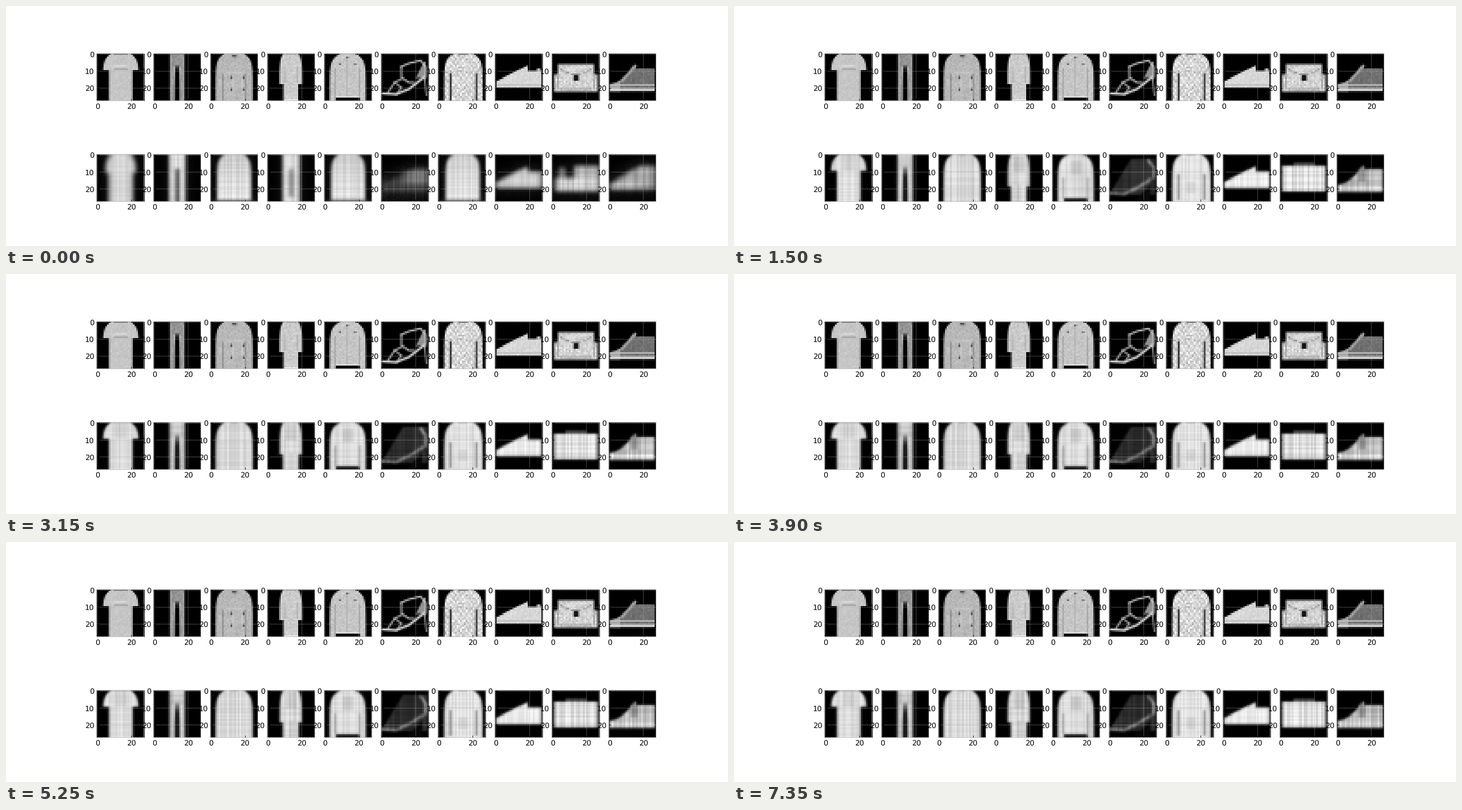
A matplotlib script that plays this animation: 1280x427 px, repeating every 7.5 s.

```python
import matplotlib.pyplot as plt
import numpy as np
from matplotlib.animation import FuncAnimation

N, FRAMES, STEP = 28, 50, 150
W, H, DPI = 1280, 427, 80
SCALE = 16 / 15  # keeps the point sizes of a 15 inch wide figure
rng = np.random.default_rng(7)
X, Y = np.meshgrid(np.arange(N) + 0.5, np.arange(N) + 0.5)

plt.rcParams.update({
    "font.family": "DejaVu Sans", "font.size": 11 * SCALE,
    "text.hinting": "none",
    "axes.edgecolor": "#bcbcbc", "axes.linewidth": 0.8 * SCALE,
    "axes.grid": True, "axes.axisbelow": True,
    "grid.color": "#b2b2b2", "grid.linestyle": "--",
    "grid.linewidth": 0.5 * SCALE,
})
for axis in ("xtick", "ytick"):
    plt.rcParams.update({
        axis + ".direction": "in", axis + ".major.size": 3.5 * SCALE,
        axis + ".major.pad": 3.5 * SCALE, axis + ".major.width": 0.8 * SCALE})


# Masks: pixel coverage between 0 and 1.
def cover(depth):
    return np.clip(depth + 0.5, 0, 1)


def overlap(pos, lo, hi):
    return np.clip(np.minimum(hi, pos + 0.5) - np.maximum(lo, pos - 0.5), 0, 1)


def box(x0, x1, y0, y1):
    return overlap(X, x0, x1) * overlap(Y, y0, y1)


def pair(near, far, y0, y1, c=14):
    """Two boxes, mirrored around the column c."""
    return overlap(np.abs(X - c), near, far) * overlap(Y, y0, y1)


def line(*pts, w=1.0):
    dist = np.full((N, N), 99.0)
    for (x0, y0), (x1, y1) in zip(pts, pts[1:]):
        dx, dy = x1 - x0, y1 - y0
        t = np.clip(((X - x0) * dx + (Y - y0) * dy) / (dx * dx + dy * dy), 0, 1)
        dist = np.minimum(dist, np.hypot(X - x0 - t * dx, Y - y0 - t * dy))
    return cover(w / 2 - dist)


def top(neck, wide, c=14, end=N, body=0, fall=3):
    """Garment with round shoulders; below `end` only the body is left."""
    half = neck + (wide - neck) * (1 - np.exp(-Y / fall))
    return cover(np.where(Y < end, half, body) - np.abs(X - c))


def legs(half, crotch, gap, c=14):
    split = gap * (1 - np.exp(-np.maximum(Y - crotch, 0) / 5))
    r = np.abs(X - c)
    return cover(half - r) * np.where(Y > crotch, cover(r - split), 1)


def shoe(toe, peak_x, peak, collar, base, power=1.0):
    """Side view: the instep climbs to a peak, then a level collar."""
    instep = toe + (peak - toe) * np.clip(X / peak_x, 0, 1) ** power
    edge = np.where(X < peak_x + 1, instep, collar)
    return cover(np.minimum(Y - edge, base - Y)) * box(0.8, 27, 0, N)


# Tones
def grain(tone, spread):
    return tone + spread * rng.standard_normal((N, N))


def compose(*layers):
    img = np.zeros((N, N))
    for mask, tone in layers:
        img = img * (1 - mask) + tone * mask
    return img


def blur(img, sigma):
    i = np.arange(N)
    k = np.exp(-((i[:, None] - i) / sigma) ** 2 / 2)
    k /= k.sum(1, keepdims=True)
    return k @ img @ k.T


def dome(c=14):
    """Round-topped block every long-sleeved top starts from."""
    return compose((top(5, 10, c, fall=2.6), 203 + 1.1 * Y),
                   (box(0, N, 27, N), 50))


# Each item: input, first guess, learned picture, aura, softness, stripes.
tee = top(5, 10.5, end=9.7, body=6.8)
shirt = (
    compose((tee, grain(198, 4)), (box(10, 18, 0, 1), 120),
            (cover(0.1 - np.abs(Y - 7.3 - ((X - 14) / 5) ** 2))
             * box(9, 19, 0, N), 240),
            (box(10, 18, 9, 9.6), 150)),
    compose((top(5, 9, end=11, body=7), 212)),
    compose((tee, 222), (box(10, 18, 0, 1), 185), (box(11, 17, 1, 10), 207)),
    26, 1.5, 0.04)

trousers = (
    compose((legs(4.2, 6.5, 1.7), grain(145, 8)), (box(10, 18, 0, 1), 115),
            (pair(3.2, 3.7, 2, N), 175), (pair(1.5, 2.2, 8, N), 205)),
    compose((legs(4.8, N, 0), 218), (box(13.4, 15, 9, N), 30)),
    compose((legs(4.4, 7, 1.3), 195), (box(10, 18, 0.5, 1.3), 240),
            (pair(1.9, 2.7, 9, N), 225)),
    24, 0.9, 0.05)

pullover = (
    compose((top(5, 10.8), grain(184, 6)), (box(12.8, 15.4, 1, 2.3), 80),
            (pair(6.6, 7, 12, N), 100), (box(9, 19, 11.5, 12), 205),
            *[(pair(2.8, 3.6, y, y + 1.5, 16), 20) for y in (13.5, 20.5)],
            (pair(2.2, 2.7, 13, 22, 16), 215)),
    dome(),
    compose((top(5, 10.8), 218), (box(12, 16, 0, 1), 170),
            (pair(6.6, 7.1, 12, N), 195)),
    24, 0.9, 0.05)

gown = top(4, 6.5, 13.8, end=17.6, body=4.2)
dress = (
    compose((gown, grain(204, 6)), (box(11, 17, 0, 1), 165),
            (pair(3.6, 3.9, 8, 17, 13.8), 130), (box(10, 18, 27, N), 235)),
    compose((legs(5, N, 0), 215), (box(13.2, 14.8, 9, 25), 85)),
    compose((top(4, 6.3, 13.8, end=19, body=4.5), 215),
            (box(11, 17, 1, 11), 195), (box(13.6, 14.4, 18, N), 165)),
    26, 1.1, 0.05)

coat = top(3.5, 10.5, 13.8)
jacket = (
    compose((coat, grain(198, 6)), (pair(6.8, 7.2, 9, 26, 13.8), 130),
            (box(13.6, 14, 3, 26), 160), (box(7, 20.6, 25, 25.7), 228),
            (box(6.8, 20.8, 26, N), 0), (pair(0, 0.6, 2, 3, 13.6), 30),
            (pair(4, 4.8, 6, 7, 13.6), 40)),
    dome(),
    compose((coat, 220), (pair(6.7, 7.4, 14, 26, 13.8), 120),
            (box(11, 17, 4, 12), 200), (box(7, 20.6, 26, N), 20)),
    24, 0.9, 0.04)

sandal = (
    compose((cover(np.minimum(X - 27.5 + Y / 2, 14.5 - Y))
             * box(20, 26, 5, N), 145),
            (line((12, 8), (16, 6), (23, 4.3), (26, 8), (26, 14)), 195),
            (line((12, 8), (12, 14), (16, 17), (19, 17)), 185),
            (line((12, 15), (8, 17), (4, 23)), 170),
            (line((8, 17), (12, 20), (9, 24)), 165),
            (line((1, 23.5), (9, 24), (16, 21), (25, 14), w=1.4), 205),
            (line((25.5, 14), (26.3, 24.5), w=0.7), 185)),
    compose((shoe(17, 20, 8, 8, 23), 70), (box(14, 27, 10, 17), 125)),
    compose((shoe(24, 13, 3, 3, 24), 44),
            (line((23, 4), (26, 8), (26, 14), w=1.5), 150),
            (line((1, 23), (9, 23.5), (16, 20), (24, 15), w=1.6), 130),
            (cover(X + Y - 42) * box(14, 24, 18, N), 8)),
    50, 1.8, 0.14)

cable = 214 + 24 * np.cos(2.1 * X) * np.cos(1.7 * Y)
blouse = top(5, 11.2, 14.8)
knit = (
    compose((blouse, np.clip(grain(cable, 14), 0, 255)),
            (box(12, 17.5, 0, 1), 110), (pair(7, 7.9, 12, N, 14.8), 15)),
    dome(14.4),
    compose((blouse, 226), (box(12, 17, 0, 1), 170),
            (pair(7, 8, 12, 27, 14.8), 100), (box(12, 17, 16, 23), 210)),
    24, 0.9, 0.04)

low = shoe(16.8, 18.5, 7.5, 10.5, 20)
sneaker = (
    compose((low, grain(215, 5)), (box(1, 27, 18, 18.4), 165),
            (box(24.5, 26.5, 9, 11), 200)),
    compose((low, 205)),
    compose((low, 236), (box(2, 27, 19.3, 19.7), 205)),
    45, 1.3, 0.04)

flap = 12.5 - ((X - 14) / 5) ** 2
bag = (
    compose((box(3.5, 24.5, 6.5, 13), grain(208, 10)),
            (box(1.3, 26.6, 12.5, 22.5), grain(212, 12)),
            (cover(0 - np.abs(Y - flap)) * box(4, 25, 8, N), 60),
            (pair(10.6, 11, 13, 21), 110), (box(5, 23, 20.8, 21.2), 85),
            (box(12.8, 15.4, 13, 16), 20)),
    compose((box(2, 27, 14, 22), 205), (box(4, 8, 8, 14), 130),
            (box(13, 27, 7, 14), 180)),
    compose((box(1.3, 26.6, 7, 22), 222), (box(8, 20, 5, 7), 65)),
    48, 1.5, 0.08)

high = shoe(18, 15.5, 7, 9, 22.3, 2)
boot = (
    compose((high, grain(112, 6)), (high * cover(7 - X), 165),
            (line((8, 16), (12, 12), (15.5, 7.5), w=1.5), 165),
            (box(1, 27, 18.2, 19), 195), (box(1, 27, 20.6, 22), 220)),
    compose((shoe(18, 18, 7, 7, 21), 165), (box(2, 18, 17.5, 20.5), 200)),
    compose((high, 188), (box(13, 17, 9, 16), 145), (box(1, 27, 19, 21), 225)),
    48, 1.6, 0.09)

items = [shirt, trousers, pullover, dress, jacket,
         sandal, knit, sneaker, bag, boot]


def haze(img, level, sigma):
    glow = level * blur(np.sign(img), 4) * (1 + grain(0, 0.15))
    return np.maximum(blur(img, sigma), glow)


first = [haze(img, aura, soft) for _, img, _, aura, soft, _ in items]
final = [blur(item[2], 0.6) for item in items]
phase = rng.uniform(0, 2 * np.pi, (2, len(items), N))
speed = rng.uniform(-2, 2, (2, len(items), N))


def decoded(i, n):
    """Item i after n steps: haze fades out while stripes slowly drift."""
    keep = np.exp(-n / 2.2)
    img = first[i] * keep + final[i] * (1 - keep)
    cols, rows = np.cos(phase[:, i] + speed[:, i] * 2 * np.log1p(n))
    gain = 1 + items[i][-1] * (cols + 0.5 * rows[:, None])
    return np.clip(img * gain, 0, 255)


def show(ax, img):
    ax.set_xticks([0, 20])
    ax.set_yticks([0, 10, 20])
    for part in [*ax.spines.values(), *ax.get_xgridlines(),
                 *ax.get_ygridlines()]:
        part.set_snap(False)
    return ax.imshow(np.clip(img, 0, 255), cmap="gray", vmin=0, vmax=255,
                     interpolation="nearest")


fig, axes = plt.subplots(2, len(items), figsize=(W / DPI, H / DPI), dpi=DPI)
dx, dy = 0.5 / W, 0.6 / H
fig.subplots_adjust(left=0.125 + dx, right=0.9 + dx, bottom=0.11 - dy,
                    top=0.88 - dy, wspace=0.2, hspace=0.2)
for ax, item in zip(axes[0], items):
    show(ax, item[0])
outputs = [show(ax, decoded(i, 0)) for i, ax in enumerate(axes[1])]


def update(n):
    for i, im in enumerate(outputs):
        im.set_data(decoded(i, n))
    return outputs


anim = FuncAnimation(fig, update, frames=FRAMES, interval=STEP,
                     repeat=True, repeat_delay=0)
plt.show()
```
